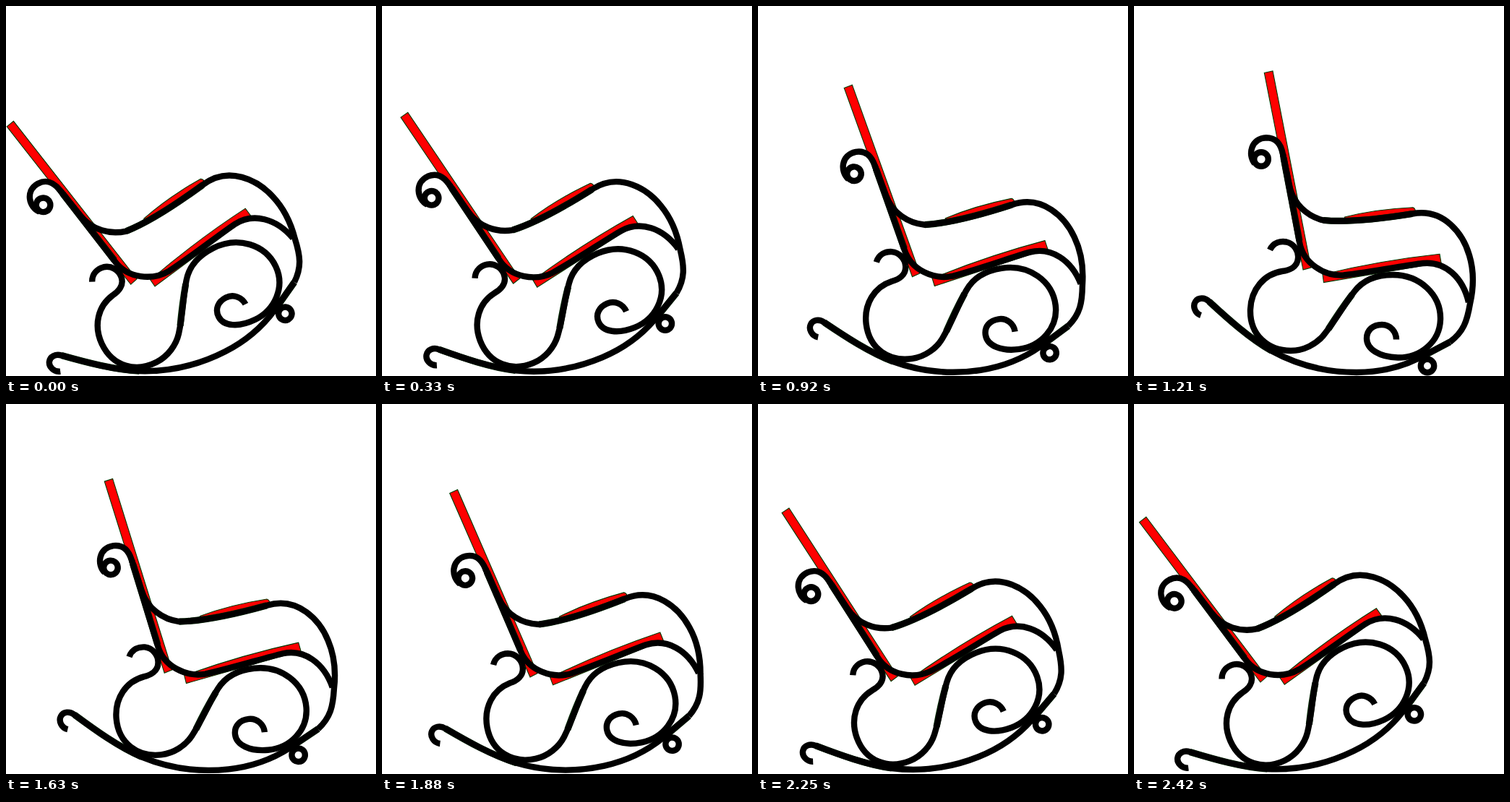
Animation, 512 px wide and 512 px high, one loop 2.46 s. Source, as an HTML page:

```html
<!DOCTYPE html>
<html lang="en">
<head>
<meta charset="utf-8">
<title>Rocking chair</title>
<style>
  html, body { margin: 0; width: 100%; height: 100%; overflow: hidden; background: #fff; }
  svg { display: block; width: 100vw; height: 100vh; }
  .iron { fill: none; stroke: #000; stroke-width: 8.4; stroke-linejoin: round; }
  .edge { fill: none; stroke: #042c04; stroke-width: 9.2; }
  .red { fill: #f00; stroke: #003c00; stroke-width: 1.1; }
</style>
</head>
<body>
<svg viewBox="0 0 512 512">
  <g id="chair">
    <!-- back, seat and armrest -->
    <path class="red" d="M180.3 92.5 L192 90 L245 362 L234 365 Z"/>
    <path class="red" d="M261 371.5 Q342 352 423 343.3 L425 355 L262.5 382.5 Z"/>
    <path class="red" d="M291 298 L291.5 292 Q335 281 386 278.7 Q390 280 389.5 287 Z"/>

    <!-- dark green rims on the straighter runs -->
    <g class="edge">
      <path d="M269 447 Q286 420 302 399"/>
      <path d="M104 409 C130 433 160 460 190 477"/>
      <path d="M404 482.5 L437 465"/>
      <path d="M207 210 L229 325"/>
      <path d="M262 296.5 C300 300 345 294 385 287.5"/>
    </g>

    <g class="iron">
      <!-- arm -->
      <path d="M167 218 C157 206 162 183 183 182.3 C196 182.3 203 190 206 205 L215 248
        C220 274 240 291 262 296.5 C300 300 345 294 385 287.5
        C430 279 456 317 464 345 C471 368 470 390 465 412 C461 436 456 451 437 465"/>
      <!-- seat rail -->
      <path d="M206 205 L224 300 L229 327 C234 356 263 374 290 372.5
        C330 368 375 359 400 356 C430 353 455 375 463 410"/>
      <!-- rocker -->
      <path d="M92.5 428 C84 425 81 415 85 409 C89 403 98 403 104 409
        C130 433 160 460 190 477 C230 499 270 507 308 507
        C345 507 375 497 395 487 L437 465"/>
      <!-- scroll -->
      <path d="M188 337.5 C193 327 203 325 211 326.5 C222 329 228 340 227 349
        C226 362 214 366 205 367 C180 371 162 392 161 420
        C160 455 185 477 217 477 C235 477 252 468 262 456
        C280 434 290 414 305 395 C318 378 338 372 358 372
        C396 372 425 400 424 434 C423 465 396 487 365 486.5
        C340 486 322 475 322 460 C322 448 331 441 343 441
        C355 441 363 451 363 461.5"/>
      <circle cx="176" cy="212" r="9.8"/>
      <circle cx="406" cy="498" r="9.2"/>
    </g>
  </g>
</svg>
<script>
  const LOOP = 2460, FRAMES = 59, SWING = 26, TILT = -27;
  const UP = { x: 291, y: 245 }, LEAN = { x: 169, y: 252.5 };
  const chair = document.getElementById('chair');
  // 24 frames a second, rounded to 10 ms
  const starts = Array.from({ length: FRAMES }, (_, n) => Math.round(n * 100 / 24) * 10);

  const clamp = v => Math.min(1, Math.max(0, v));
  const mix = (a, b, p) => a + (b - a) * p;
  const easeIn = p => p - 0.27 * p * (1 - p);

  // 0 = leaning back, 1 = upright
  function pose(n) {
    return n < 33 ? easeIn(clamp((n - 3) / SWING)) : 1 - clamp((n - 33) / SWING);
  }

  function draw(time) {
    const t = time % LOOP;
    const n = starts.filter(s => s <= t).length - 1;
    const p = pose(n);
    const x = mix(LEAN.x, UP.x, p), y = mix(LEAN.y, UP.y, p);
    chair.setAttribute('transform',
      `translate(${x} ${y}) rotate(${mix(TILT, 0, p)}) translate(${-UP.x} ${-UP.y})`);
  }

  const begin = performance.now();
  function tick() {
    draw(performance.now() - begin);
    requestAnimationFrame(tick);
  }
  tick();
</script>
</body>
</html>
```
